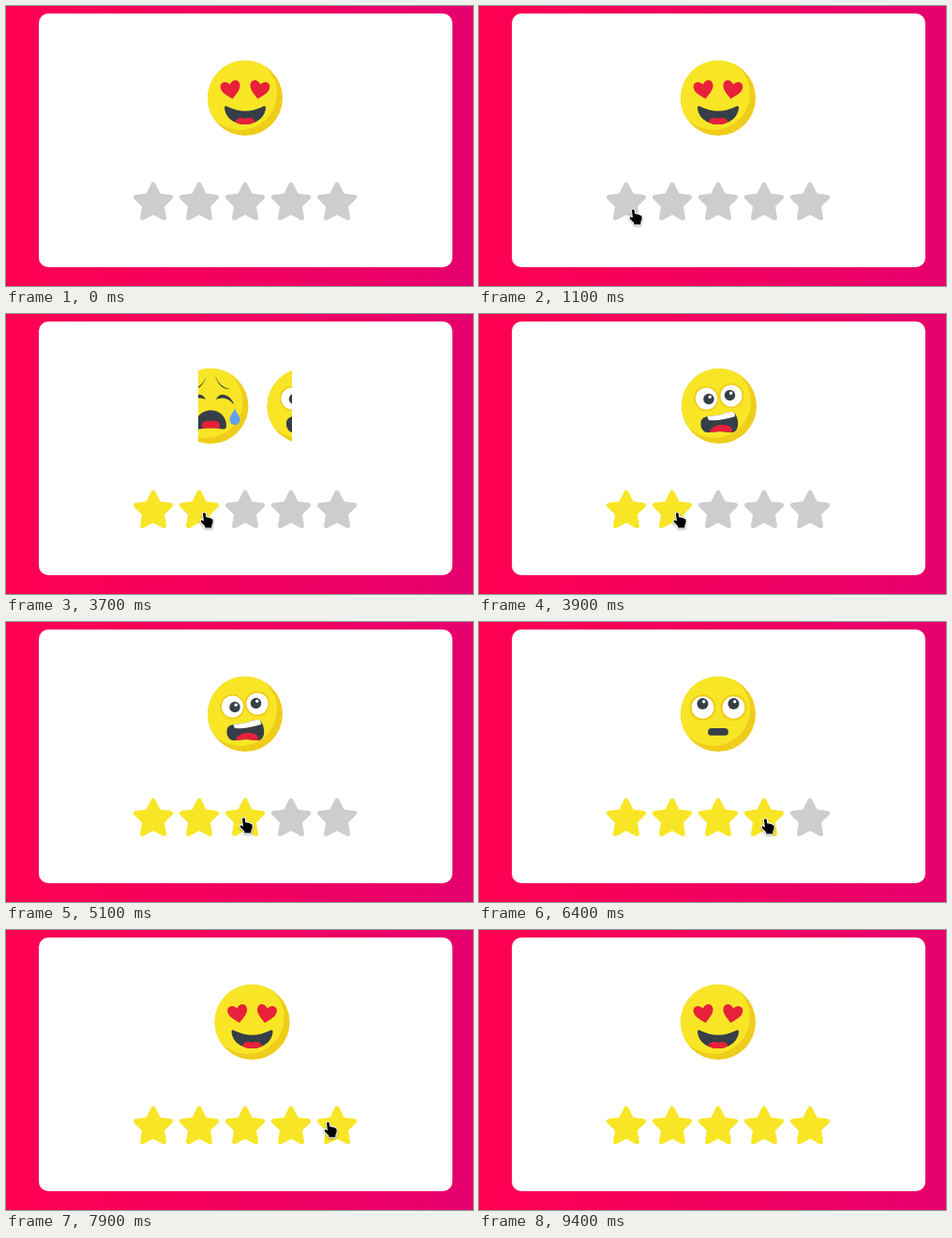
Write an HTML page with a canvas that moves like this. It is 498x298 px and loops after 10000 ms.

```html
<!DOCTYPE html>
<html lang="en">
<head>
<meta charset="utf-8">
<title>Star rating</title>
<style>
html, body { margin: 0; width: 100%; height: 100%; overflow: hidden; }
canvas { display: block; }
</style>
</head>
<body>
<canvas id="stage" width="498" height="298"></canvas>
<script>
const ctx = document.getElementById('stage').getContext('2d');
const LOOP = 10000, STEP = 100, SLOT = 100;
const YELLOW = '#f8e626', SHADE = '#efcd1b', GREY = '#cdcdcd';
const DARK = '#363f47', RED = '#e8213a', WHITE = '#fff';

// Ratings: time, slide length, time the last pixel settles
const clicks = [
  { at: 2300, dur: 300, settle: 2600 },
  { at: 3640, dur: 260, settle: 4100 },
  { at: 5100, dur: 200, settle: 5500 },
  { at: 6400, dur: 300, settle: 6900 },
  { at: 7700, dur: 300, settle: 8000 }
];

// Pointer moves: first step, last step, x, y
const moves = [
  [500, 500, 112, 82], [600, 800, 186, 271], [900, 1100, 160, 216],
  [2500, 2500, 158, 215], [2800, 2800, 163, 216], [3000, 3200, 207, 211],
  [4100, 4300, 249, 208], [5500, 5600, 301, 209], [6900, 6900, 325, 203],
  [7000, 7100, 340, 203], [7300, 7300, 339, 204], [8900, 9000, 324, 205],
  [9200, 9300, 121, 24]
];
const ENTER = 500, LEAVE = 9400;

const lerp = (a, b, k) => a + (b - a) * k;

// The CSS "ease" curve
function ease(x) {
  if (x <= 0) return 0;
  if (x >= 1) return 1;
  let lo = 0, hi = 1, s;
  for (let i = 0; i < 20; i++) {
    s = (lo + hi) / 2;
    const bx = 0.75 * s * (1 - s) * (1 - s) + 0.75 * s * s * (1 - s) + s * s * s;
    if (bx < x) lo = s; else hi = s;
  }
  return 0.3 * s * (1 - s) * (1 - s) + 3 * s * s * (1 - s) + s * s * s;
}

function shape(d, color, inner) {
  const path = new Path2D(d);
  ctx.fillStyle = color;
  ctx.fill(path);
  if (!inner) return;
  ctx.save();
  ctx.clip(path);
  inner();
  ctx.restore();
}

function oval(x, y, rx, ry, color, turn = 0) {
  ctx.beginPath();
  ctx.ellipse(x, y, rx, ry, turn, 0, Math.PI * 2);
  ctx.fillStyle = color;
  ctx.fill();
}

function mirrored(draw) {
  for (const side of [-1, 1]) {
    ctx.save();
    ctx.scale(side, 1);
    draw();
    ctx.restore();
  }
}

function head() {
  oval(0, 0, 40, 40, SHADE);
  ctx.save();
  ctx.clip();
  oval(-5, -5, 39, 39, YELLOW);
  ctx.restore();
}

function eye(x, y, r, px, py, pr) {
  oval(x, y, r + 1.8, r + 1.8, SHADE);
  oval(x, y, r, r, WHITE);
  oval(px, py, pr, pr, DARK);
  oval(px + 1.2, py - 2.2, 1.7, 1.7, WHITE);
}

function crying() {
  mirrored(() => {
    shape('M4.5-32.5Q9-20 20-18Q9-17.5 4.5-32.5Z', DARK);
    shape('M5.5-7Q9-14 16-11.5Q22-9 25-1.5Q18-9 12-8.5Q8-8.5 5.5-7Z', DARK);
  });
  shape('M-16.5 22C-17 11-9 4.5 0 4.5C9 4.5 17 11 16.5 22Q16 25 12 24.5Q0 22-12 24.5Q-16 25-16.5 22Z', DARK, () => {
    oval(-3.5, 21, 6, 5.5, RED);
    oval(3.5, 21, 6, 5.5, RED);
  });
  shape('M25.5 2.5C27 7 31 10 31 14.5A5.5 5.5 0 0 1 20 14.5C20 10 24 7 25.5 2.5Z', '#62a1ef');
}

function scared() {
  eye(-13.5, -8, 11.5, -11, -7.5, 5.7);
  eye(13, -11, 11.5, 11.5, -11.5, 5.7);
  shape('M-19.5 17C-18 10-10 11-3 10C5 9 13 3 17 8C20 12 22 21 18 26C14 30 10 27 1 27C-7 27-13 30-17 26Q-20 23-19.5 17Z', DARK, () => {
    shape('M-14 8L16 2L17 11Q2 16-11 15Z', WHITE);
    oval(2, 26.5, 12, 6.5, RED, -0.12);
  });
}

function rolling() {
  mirrored(() => oval(16.5, -7, 14, 14, SHADE));
  for (const x of [-16.5, 16.5]) eye(x, -7, 11.8, x, -11, 6);
  shape('M-7 15H7A3.8 3.8 0 0 1 7 22.8H-7A3.8 3.8 0 0 1-7 15Z', DARK);
}

function happy() {
  for (const x of [-16.5, 16.5]) eye(x, -6.5, 13, x, -6.5, 6.3);
  mirrored(() => shape('M16-29.5Q27-32 32.5-20.5Q25-28 16-26.5Z', DARK));
  shape('M-27 9Q0 19 27 9C27 23 15 32 0 32C-15 32-27 23-27 9Z', DARK, () => {
    shape('M-25 8Q0 18 25 8L22 16Q0 25-22 16Z', WHITE);
    oval(0, 29, 17, 7.5, RED);
  });
}

function loving() {
  mirrored(() => {
    ctx.save();
    ctx.translate(15.2, -9);
    ctx.rotate(0.18);
    shape('M0 10C-4 6-10.5 2-10.5-4C-10.5-10-3-11 0-5.5C3-11 10.5-10 10.5-4C10.5 2 4 6 0 10Z', RED);
    ctx.restore();
  });
  shape('M-22 9.5Q-21 7.5-18 9.5Q0 18 18 9.5Q21 7.5 22 9.5C22 20 12 28 0 28C-12 28-22 20-22 9.5Z', DARK, () => {
    oval(-4, 26, 6.5, 5, RED);
    oval(4, 26, 6.5, 5, RED);
  });
}

const faces = [crying, scared, rolling, happy, loving];

function drawFaces(pos) {
  ctx.save();
  ctx.beginPath();
  ctx.rect(205, 48, SLOT, 100);
  ctx.clip();
  faces.forEach((face, i) => {
    const dx = (i - pos) * SLOT;
    if (Math.abs(dx) >= SLOT) return;
    ctx.save();
    ctx.translate(255 + dx, 98);
    head();
    face();
    ctx.restore();
  });
  ctx.restore();
}

function star(x, y, color) {
  const R = 25.2, tip = 2.5;
  const at = (k, r) => [x + r * Math.sin(k * Math.PI / 5), y - r * Math.cos(k * Math.PI / 5)];
  ctx.beginPath();
  ctx.moveTo(...at(-1, R / 2));
  for (let k = 0; k < 10; k += 2) {
    ctx.arcTo(...at(k, R), ...at(k + 1, R / 2), tip);
    ctx.lineTo(...at(k + 1, R / 2));
  }
  ctx.closePath();
  ctx.fillStyle = color;
  ctx.fill();
}

const HAND = new Path2D('M3 1.8Q3 .5 4.3 .5Q5.6 .5 5.8 1.8L6.3 5.5Q8 4.6 9 6Q10.8 5.3 11.5 6.8Q13.6 6.6 13.7 8.8Q13.8 12 12.4 14V16.5H5.2V14.8L1 10.4Q0 8.7 1.6 8.2L3.9 9.6Z');
const ARROW = new Path2D('M1 1V14.5L4.2 11.6L6.4 16.7L8.8 15.7L6.6 10.7H11Z');

function drawPointer(x, y) {
  const path = y > 186 && y < 232 ? HAND : ARROW;
  ctx.save();
  ctx.translate(x, y);
  ctx.lineJoin = 'round';
  ctx.lineWidth = 2;
  ctx.strokeStyle = WHITE;
  ctx.shadowColor = 'rgba(0,0,0,.35)';
  ctx.shadowBlur = 2;
  ctx.shadowOffsetY = 1;
  ctx.stroke(path);
  ctx.shadowColor = 'transparent';
  ctx.fillStyle = '#000';
  ctx.fill(path);
  ctx.restore();
}

function facePosition(t) {
  let pos = 4;
  clicks.forEach((c, i) => {
    if (t < c.at) return;
    const k = ease((t - c.at) / c.dur);
    pos = lerp(pos, i, t < c.settle ? Math.min(k, 0.99) : 1);
  });
  return pos;
}

function pointerAt(t) {
  let x = 0, y = 0;
  for (const [first, last, tx, ty] of moves) {
    if (t < first) break;
    const k = Math.min(1, (t - first + STEP) / (last - first + STEP));
    x = lerp(x, tx, k);
    y = lerp(y, ty, k);
  }
  return [x, y];
}

const sky = ctx.createLinearGradient(0, 0, 498, 0);
sky.addColorStop(0, '#ff0052');
sky.addColorStop(1, '#e5006d');

function render(t) {
  ctx.fillStyle = sky;
  ctx.fillRect(0, 0, 498, 298);
  ctx.beginPath();
  ctx.roundRect(35, 8, 441, 270, 10);
  ctx.fillStyle = WHITE;
  ctx.fill();

  drawFaces(facePosition(t));
  clicks.forEach((c, i) => star(157 + i * 49, 209.6, t >= c.at ? YELLOW : GREY));
  if (t >= ENTER && t < LEAVE) drawPointer(...pointerAt(t));
}

const start = performance.now();
function tick() {
  const t = (performance.now() - start + 4) % LOOP;
  render(Math.floor(t / STEP) * STEP);
  requestAnimationFrame(tick);
}
tick();
</script>
</body>
</html>
```
